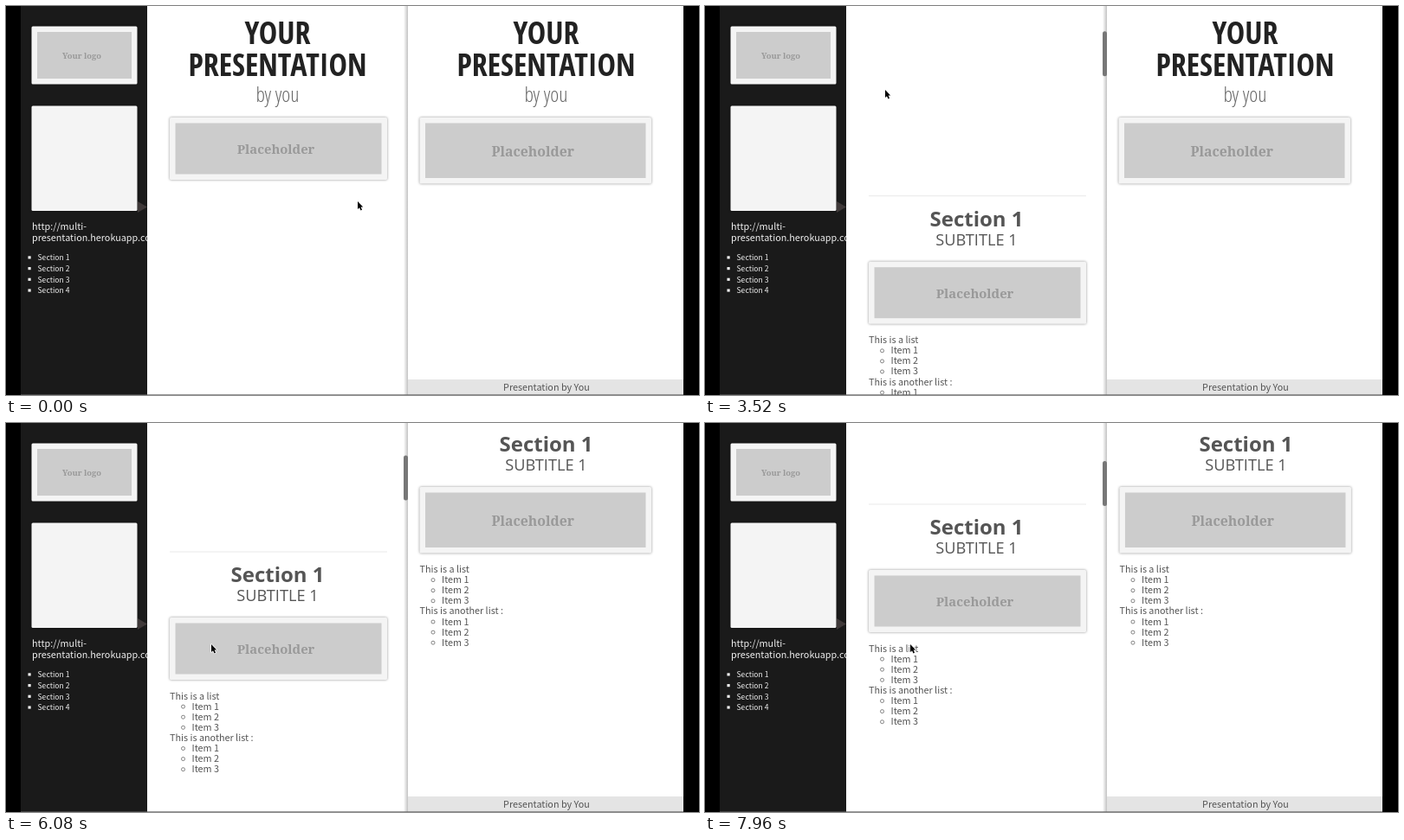
Write an HTML page with a canvas that moves like this. It is 800 px wide and 450 px high and loops after 8000 ms.

```html
<!DOCTYPE html>
<html lang="en">
<head>
<meta charset="utf-8">
<title>Presentation</title>
<style>
html, body { margin: 0; width: 100%; height: 100%; overflow: hidden; background: #000; }
canvas { display: block; width: 800px; height: 450px; }
</style>
</head>
<body>
<canvas id="stage" width="800" height="450"></canvas>
<script>
const ctx = document.getElementById('stage').getContext('2d');
const LOOP = 8000, STEP = 40, SLIDE = 318.5;
const LEFT = 163, SPLIT = 464, RIGHT = 782;
const HEAD = '"Open Sans", "Noto Sans", sans-serif';
const NARROW = '"Open Sans Condensed", "Roboto Condensed", "Liberation Sans Narrow", sans-serif';
const BODY = '"Noto Sans CJK SC", "Noto Sans CJK JP", "Noto Sans", sans-serif';
const SLAB = '"Noto Serif", serif';

// [time, value] keys
const scrollKeys = [[2800, 0], [2960, 21], [3500, 225], [4040, 412], [4400, 460], [4700, 470],
  [5600, 470], [6080, 303], [6450, 125], [6880, 160], [7300, 265], [7700, 340], [7960, 358]];
const cursorX = [[800, 406], [1700, 297], [2500, 208], [5040, 208], [5320, 237]];
const cursorY = [[800, 226], [1700, 190], [2500, 97], [5040, 97], [5320, 256]];
const slideMoves = [[4410, 0, 1], [6542, 1, 0], [7381, 0, 1]];
const SLIDE_TIME = 600;

const clamp = v => Math.max(0, Math.min(1, v));
const swing = x => 0.5 - Math.cos(Math.PI * clamp(x)) / 2;

// Cubic interpolation that never overshoots its keys
function curve(keys, t) {
  const last = keys.length - 1;
  if (t <= keys[0][0]) return keys[0][1];
  if (t >= keys[last][0]) return keys[last][1];
  const slope = i => (keys[i + 1][1] - keys[i][1]) / (keys[i + 1][0] - keys[i][0]);
  const tangent = i => {
    if (i === 0 || i === last) return 0;
    const a = slope(i - 1), b = slope(i);
    return a * b <= 0 ? 0 : 2 * a * b / (a + b);
  };
  const i = keys.findIndex(k => k[0] > t) - 1;
  const [t0, v0] = keys[i], [t1, v1] = keys[i + 1];
  const h = t1 - t0, u = (t - t0) / h, w = 1 - u;
  return v0 * (1 + 2 * u) * w * w + tangent(i) * h * u * w * w
    + v1 * u * u * (3 - 2 * u) - tangent(i + 1) * h * u * u * w;
}

function slideAt(t) {
  let pos = 0;
  for (const [start, from, to] of slideMoves) {
    if (t >= start) pos = from + (to - from) * swing((t - start) / SLIDE_TIME);
  }
  return pos;
}

function rect(x, y, w, h, color) {
  ctx.fillStyle = color;
  ctx.fillRect(x, y, w, h);
}

function text(str, x, y, font, color, align = 'left') {
  ctx.font = font;
  ctx.fillStyle = color;
  ctx.textAlign = align;
  ctx.fillText(str, x, y);
}

function clipped(x0, x1, draw) {
  ctx.save();
  ctx.beginPath();
  ctx.rect(x0, 0, x1 - x0, 450);
  ctx.clip();
  draw();
  ctx.restore();
}

function card(x, y, w, h, label, size) {
  ctx.save();
  ctx.shadowColor = 'rgba(0,0,0,.45)';
  ctx.shadowBlur = 3;
  ctx.beginPath();
  ctx.roundRect(x, y, w, h, 1.5);
  ctx.fillStyle = '#f4f4f4';
  ctx.fill();
  ctx.restore();
  if (!label) return;
  rect(x + 6.5, y + 6.5, w - 13, h - 13, '#ccc');
  text(label, x + w / 2 - 3, y + h / 2 + size * 0.4, `bold ${size}px ${SLAB}`, '#999', 'center');
}

function placeholder(x, y, w, h) {
  card(x, y, w, h, 'Placeholder', w * 0.059);
}

function titleSlide(mid, x, w, h, y) {
  const bold = `bold condensed 36px ${NARROW}`;
  text('YOUR', mid, y + 44, bold, '#222', 'center');
  text('PRESENTATION', mid, y + 81, bold, '#222', 'center');
  text('by you', mid, y + 111, `300 condensed 24px ${HEAD}`, '#666', 'center');
  placeholder(x, y + 129, w, h);
}

function sectionSlide(mid, x, w, h, y) {
  text('Section 1', mid, y + 33, `bold 24px ${HEAD}`, '#555', 'center');
  text('SUBTITLE 1', mid, y + 55, `18.2px ${HEAD}`, '#555', 'center');
  placeholder(x, y + 74, w, h);
  const font = `10.8px ${BODY}`;
  const lines = ['This is a list', 1, 2, 3, 'This is another list :', 1, 2, 3];
  lines.forEach((line, i) => {
    const base = y + h + 96.5 + i * 12.1;
    if (typeof line === 'string') return text(line, x, base, font, '#555');
    text('Item ' + line, x + 25.5, base, font, '#555');
    ctx.beginPath();
    ctx.arc(x + 15.5, base - 3.5, 2, 0, 7);
    ctx.lineWidth = 0.8;
    ctx.strokeStyle = '#666';
    ctx.stroke();
  });
}

function sidebar() {
  rect(17, 0, LEFT - 17, 450, '#1a1a1a');
  card(29.5, 23.5, 122, 67, 'Your logo', 9.4);
  card(29.5, 115.5, 122, 121.5);
  ctx.fillStyle = '#3f3939';
  ctx.beginPath();
  ctx.moveTo(152, 226);
  ctx.lineTo(163, 232.5);
  ctx.lineTo(152, 239);
  ctx.fill();
  const font = `10.8px ${BODY}`;
  text('http://multi-', 30, 259, font, '#eee');
  text('presentation.herokuapp.com', 30, 271.5, font, '#eee');
  for (let i = 0; i < 4; i++) {
    const y = 294.3 + i * 12.7;
    rect(25.5, y - 5, 3.2, 3.2, '#eee');
    text('Section ' + (i + 1), 36.5, y, `8.6px ${BODY}`, '#eee');
  }
}

function scrollbar(t, scroll) {
  const alpha = t < 2800 ? 0 : t < 5600 ? 1 - clamp((t - 5040) / 280) : 1;
  if (!alpha) return;
  ctx.globalAlpha = alpha;
  ctx.beginPath();
  ctx.roundRect(459, 2 + scroll * 0.117, 5, 52, 2.5);
  ctx.fillStyle = '#777';
  ctx.fill();
  ctx.globalAlpha = 1;
}

function leftPane(t) {
  const scroll = curve(scrollKeys, t);
  rect(LEFT, 0, SPLIT - LEFT, 450, '#fff');
  titleSlide(313.5, 189, 251, 72, -scroll);
  rect(189, 451.5 - scroll, 251, 1, '#eaeaea');
  sectionSlide(313.5, 189, 251, 72, 454 - scroll);
  const shade = ctx.createLinearGradient(459, 0, SPLIT, 0);
  shade.addColorStop(0, 'rgba(0,0,0,0)');
  shade.addColorStop(1, 'rgba(0,0,0,.24)');
  rect(459, 0, SPLIT - 459, 450, shade);
  scrollbar(t, scroll);
}

function rightPane(t) {
  const shift = slideAt(t) * SLIDE;
  rect(SPLIT, 0, RIGHT - SPLIT, 450, '#fff');
  titleSlide(623.5 - shift, 477.5 - shift, 267.5, 76.5, 0);
  const x = SLIDE - shift;
  sectionSlide(623.5 + x, 477.5 + x, 267.5, 76.5, 0);
  rect(SPLIT, 432, RIGHT - SPLIT, 18, '#e4e4e4');
  text('Presentation by You', 624, 445, `10.8px ${BODY}`, '#555', 'center');
}

function cursor(x, y) {
  const points = [[0, 0], [0, 9], [2, 7.2], [3.5, 10.4], [5, 9.7], [3.6, 6.6], [6.2, 6.4]];
  ctx.beginPath();
  points.forEach(([dx, dy]) => ctx.lineTo(x + dx, y + dy));
  ctx.closePath();
  ctx.lineJoin = 'round';
  ctx.lineWidth = 1.4;
  ctx.strokeStyle = '#fff';
  ctx.stroke();
  ctx.fillStyle = '#000';
  ctx.fill();
}

function draw(t) {
  rect(0, 0, 800, 450, '#000');
  clipped(17, LEFT, sidebar);
  clipped(LEFT, SPLIT, () => leftPane(t));
  clipped(SPLIT, RIGHT, () => rightPane(t));
  rect(17, 449, RIGHT - 17, 1, 'rgba(90,90,90,.6)');
  cursor(curve(cursorX, t), curve(cursorY, t));
}

function tick() {
  const t = performance.now() % LOOP;
  draw(Math.floor(t / STEP) * STEP);
  requestAnimationFrame(tick);
}
tick();
</script>
</body>
</html>
```
